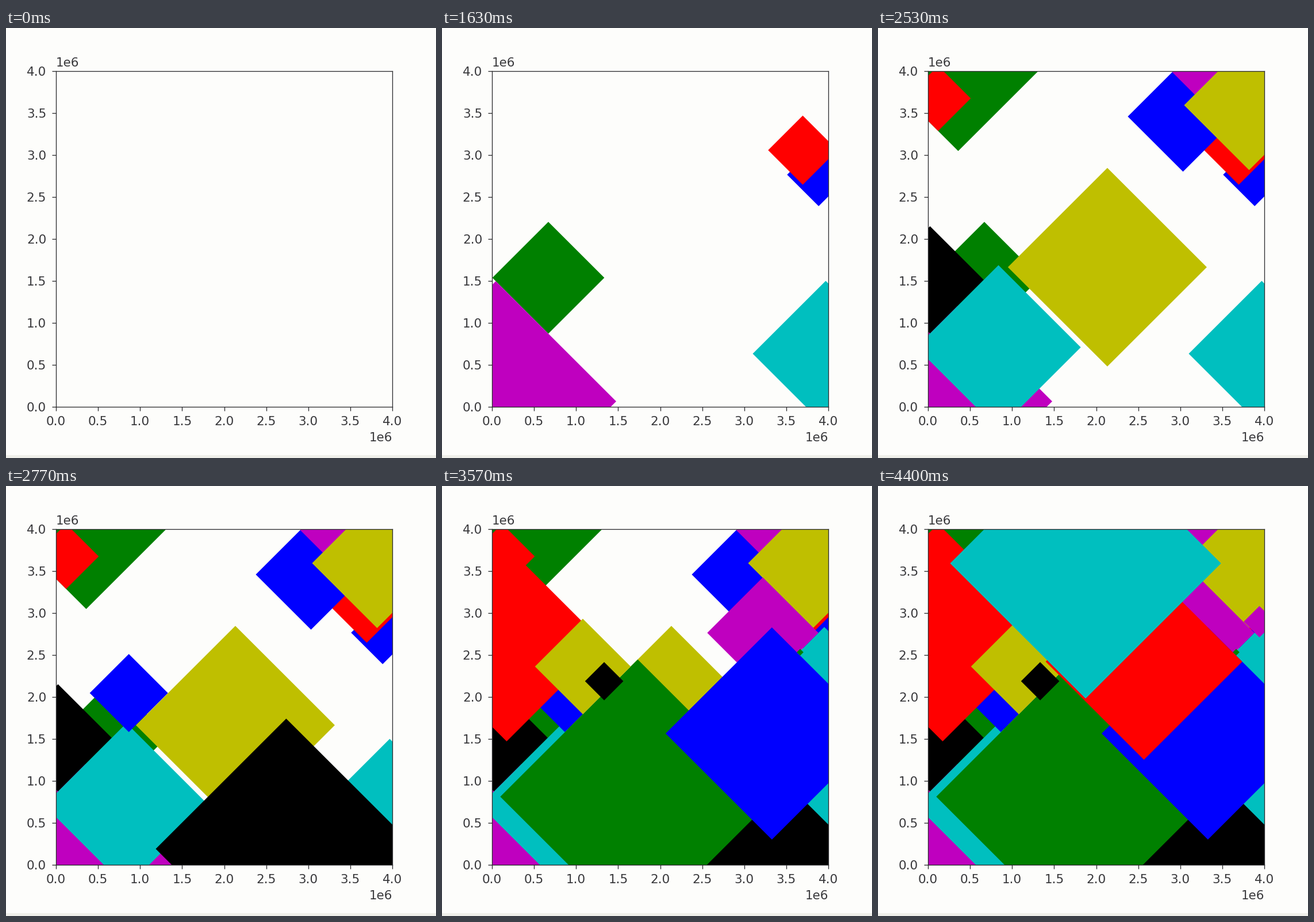
These frames come from a looping animation (748 by 748 pixels, 5630 ms). A matplotlib script:

```python
import numpy as np
import matplotlib.pyplot as plt
from matplotlib.animation import FuncAnimation
from matplotlib.patches import Rectangle, RegularPolygon

SIZE, DPI = 748, 136
LOOP_MS, FRAMES = 5630, 153
FIRST, STEP = 31, 3          # frame of the first diamond, frames between diamonds
LIMIT = 4e6
PAPER, STRIP, INK, TEXT = "#fdfdfb", "#efefea", "#2b2b2e", "#38383b"
COLORS = "bgrcmyk"

# positions in thousands, sensors in order of appearance
BEACONS = np.array([
    (3638, 2520), (4038, 2988), (2997, 4080), (4099, 3101), (-108, 3515),
    (1518, 2232), (346, 1196), (1079, 1795), (3917, -183),
]) * 1e3
SENSORS = np.array([
    (3885, 2766), (670, 1538), (3696, 3058), (3969, 633), (45, 65),
    (2133, 1664), (24, 1513), (3033, 3459), (359, 3996), (120, 3675),
    (838, 709), (3505, 3988), (3819, 3594), (2738, 190), (866, 2047),
    (1733, 812), (174, 2634), (3952, 2474), (3221, 2764), (1080, 2363),
    (1334, 2188), (3329, 1565), (3665, 2533), (2568, 2421), (1874, 3592),
    (3942, 2897),
]) * 1e3

plt.rcParams.update({"font.family": "DejaVu Sans", "font.size": 11.38})

fig = plt.figure(figsize=(SIZE / DPI, SIZE / DPI), dpi=DPI, facecolor=PAPER)
fig.add_artist(Rectangle((0, 0), 1, 5 / SIZE, color=STRIP, lw=0))

ax = fig.add_axes([87 / SIZE, 89 / SIZE, 585 / SIZE, 584 / SIZE],
                  facecolor=PAPER)
ax.set(xlim=(0, LIMIT), ylim=(0, LIMIT))
for axis, pad in ((ax.xaxis, 4.6), (ax.yaxis, 5.0)):
    axis.set_ticks(np.arange(0, LIMIT + 1, 5e5))
    axis.set_tick_params(length=3.9, width=0.7, pad=pad,
                         color=INK, labelcolor=TEXT)
    axis.get_offset_text().set(color=TEXT, size=11.38)
    axis.OFFSETTEXTPAD = 4.2
for spine in ax.spines.values():
    spine.set(color=INK, linewidth=0.7)


def diamond(sensor, color):
    """Area within the Manhattan distance to the nearest beacon."""
    reach = np.abs(BEACONS - sensor).sum(axis=1).min()
    return ax.add_patch(RegularPolygon(sensor, 4, radius=reach, lw=0,
                                       facecolor=color, visible=False))


patches = [diamond(sensor, COLORS[i % len(COLORS)])
           for i, sensor in enumerate(SENSORS)]


def update(frame):
    for i, patch in enumerate(patches):
        patch.set_visible(frame >= FIRST + STEP * i)
    return patches


anim = FuncAnimation(fig, update, frames=FRAMES, interval=LOOP_MS / FRAMES,
                     init_func=lambda: update(0), repeat=True, repeat_delay=0,
                     blit=False)
plt.show()
```
